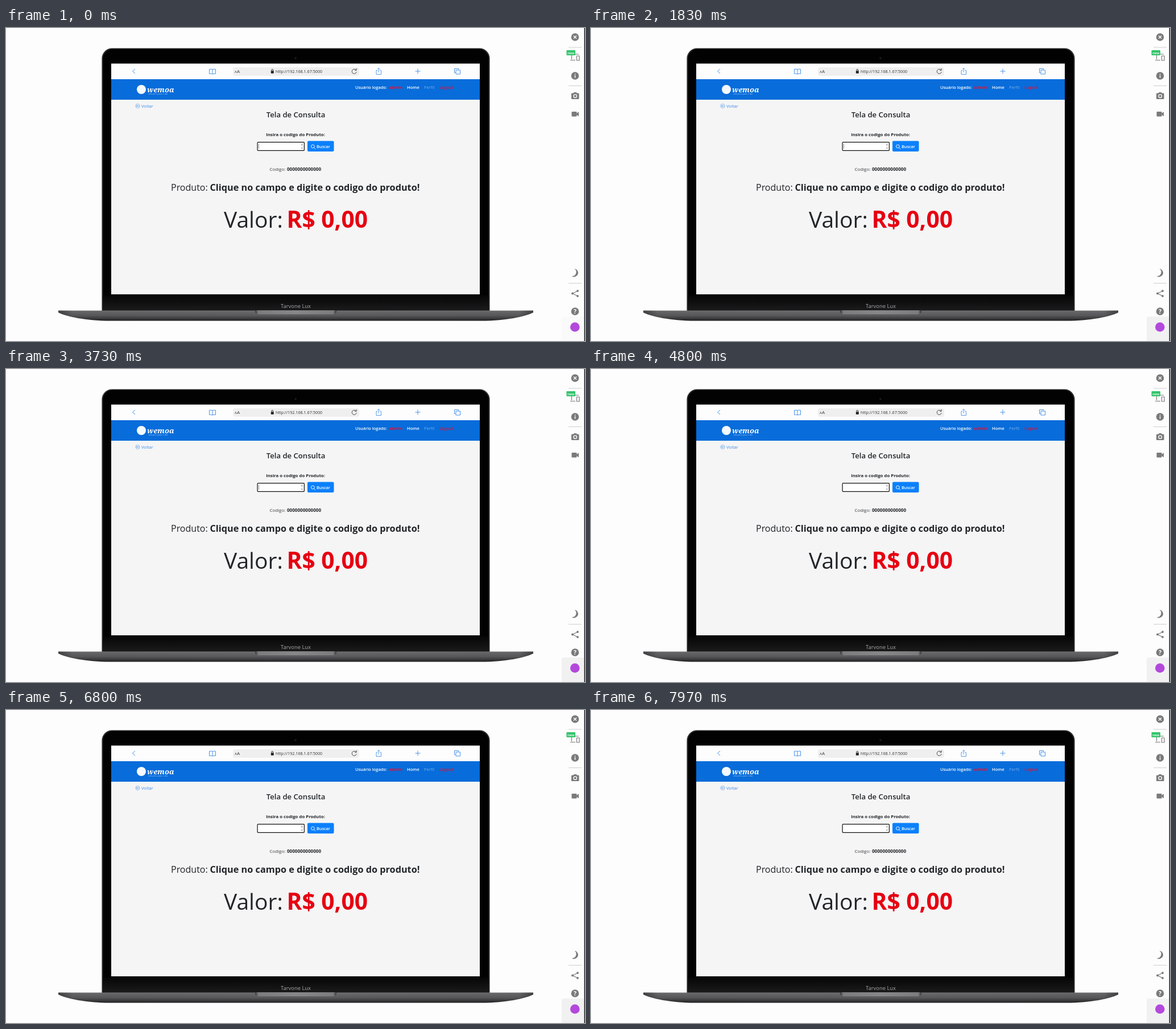
Recreate the animation shown at these times as an HTML page with a canvas. Size 1018 by 550 pixels, loop 8000 ms.

```html
<!DOCTYPE html>
<html lang="pt-BR">
<head>
<meta charset="utf-8">
<title>Tela de Consulta</title>
<style>
  html, body { margin: 0; width: 100%; height: 100%; overflow: hidden; background: #fdfdfd; }
  canvas { display: block; }
</style>
</head>
<body>
<canvas id="stage" width="1018" height="550"></canvas>
<script>
const ctx = document.getElementById('stage').getContext('2d');
const LOOP = 8000;
const SANS = '"Open Sans", "Noto Sans", sans-serif';
const INK = '#212529', ICON = '#7a7a7a', BLUE = '#4a94ea', RED = '#e60012';

function rect(x, y, w, h, fill, r = 0) {
  ctx.fillStyle = fill;
  ctx.beginPath();
  ctx.roundRect(x, y, w, h, r);
  ctx.fill();
}

function disc(x, y, r, fill) {
  ctx.fillStyle = fill;
  ctx.beginPath();
  ctx.arc(x, y, r, 0, Math.PI * 2);
  ctx.fill();
}

function path(d, color, width = 1) {
  ctx.strokeStyle = color;
  ctx.lineWidth = width;
  ctx.stroke(new Path2D(d));
}

function shape(d, fill) {
  ctx.fillStyle = fill;
  ctx.fill(new Path2D(d));
}

function text(str, x, y, size, color, weight = 400, align = 'left', family = SANS) {
  ctx.font = `${weight} ${size}px ${family}`;
  ctx.fillStyle = color;
  ctx.textAlign = align;
  ctx.fillText(str, x, y);
}

function gradient(x0, y0, x1, y1, ...stops) {
  const g = ctx.createLinearGradient(x0, y0, x1, y1);
  stops.forEach(([at, color]) => g.addColorStop(at, color));
  return g;
}

function laptop() {
  // lid
  rect(168.5, 35.5, 682, 462, '#2b2b2c', [18, 18, 0, 0]);
  rect(170.5, 37, 678, 460, '#020202', [17, 17, 0, 0]);
  rect(170.5, 470, 678, 27, gradient(0, 470, 0, 497, [0, '#060606'], [1, '#1b1b1c']));
  disc(509, 53, 2, '#15181c');
  text('Tarvone Lux', 509.5, 492, 9.4, '#a9a9ab', 400, 'center');

  // base
  const base = 'M92 496.5 H927 V500 C912 507 880 514.5 835 514.5 H184 C139 514.5 107 507 92 500 Z';
  shape(base, gradient(0, 496, 0, 515,
    [0, '#7d7d7f'], [0.12, '#69696c'], [0.5, '#59595c'], [0.8, '#38383a'], [1, '#1c1c1e']));
  shape(base, gradient(92, 0, 927, 0,
    [0, 'rgba(20,20,20,.5)'], [0.03, 'rgba(20,20,20,.05)'], [0.5, 'rgba(20,20,20,0)'],
    [0.97, 'rgba(20,20,20,.05)'], [1, 'rgba(20,20,20,.5)']));
  rect(438, 496, 143, 7, gradient(438, 0, 581, 0,
    [0, '#353537'], [0.04, '#7c7c7e'], [0.5, '#878789'], [0.96, '#7c7c7e'], [1, '#353537']), [0, 0, 5, 5]);
}

function toolbar() {
  rect(185, 62.5, 648, 28, '#fdfdfd');
  rect(399, 69, 222, 15, '#efeff0', 4);
  path('M227 72 L222.5 76 L227 80', BLUE);
  path('M363 73 Q360 71.5 357.5 72.5 V80.5 Q360 79.5 363 81 Q366 79.5 368.5 80.5 V72.5 Q366 71.5 363 73 V81', BLUE);
  text('A', 402, 79, 6, '#333');
  text('A', 406, 79, 8, '#333');
  path('M466.8 75.5 V74 Q466.8 72.5 468.2 72.5 Q469.7 72.5 469.7 74 V75.5', '#222', 0.9);
  rect(465.8, 75.3, 5, 4.4, '#222', 0.6);
  text('http://192.168.1.67:5000', 474, 79, 7.2, '#333');
  path('M615.5 74 A4 4 0 1 0 616.2 77', '#444');
  path('M613 74.2 H616.2 V71', '#444');
  path('M653 74.5 H651 V81.5 H659.5 V74.5 H657.5 M655.2 78 V70.5 M653 72.6 L655.2 70.4 L657.4 72.6', BLUE, 0.9);
  path('M719.5 76 H728.5 M724 71.5 V80.5', BLUE);
  path('M788.5 71.5 H795.5 V73.5 M788.5 71.5 V78.5 H790.5 M791 74 H798.5 V81 H791 Z', BLUE);
}

function navbar() {
  rect(185, 90, 648, 36, '#086cda');
  disc(238, 108, 8, '#f4f9ff');
  text('wemoa', 248, 112.5, 13, '#fff', 'italic 700', 'left', '"Noto Serif", serif');
  text('soluções para o dia', 250, 117, 3.8, '#a9cdf5');
  text('Usuário logado:', 614, 107, 7.4, '#fff', 600);
  text('admin', 673, 107, 7.5, '#e8102f', 700);
  text('Home', 705, 107, 7.5, '#fff', 600);
  text('Perfil', 735, 107, 7.5, '#78aee9');
  text('Logout', 762, 107, 7.3, '#d8143a', 600);
}

function page() {
  rect(185, 126, 648, 342, '#f5f5f5');
  ctx.strokeStyle = '#6aa7f0';
  ctx.lineWidth = 0.8;
  ctx.beginPath();
  ctx.arc(231.5, 137, 3.6, 0, Math.PI * 2);
  ctx.stroke();
  path('M234 137 H229.6 M231.2 135.3 L229.5 137 L231.2 138.7', '#4b93ec', 0.8);
  text('Voltar', 238, 139.6, 7.6, '#3d8bea');

  text('Tela de Consulta', 509.5, 156.5, 13.1, INK, 600, 'center');
  text('Insira o codigo do Produto:', 509, 190, 7.8, INK, 700, 'center');

  rect(441.5, 200, 83.5, 16, '#111', 2);
  rect(442.7, 201.2, 81.1, 13.6, '#fff', 1);
  shape('M518.8 206 L520.3 204 L521.8 206 Z M518.8 210.5 L520.3 212.5 L521.8 210.5 Z', '#777');

  rect(530, 198.5, 46.5, 18.5, '#0b80fb', 2);
  path('M542.3 208 a2.9 2.9 0 1 1 -5.8 0 a2.9 2.9 0 1 1 5.8 0 M541.4 210.2 L544 212.8', '#fff', 0.9);
  text('Buscar', 546, 211, 7.3, '#fff', 600);

  text('Codigo:', 463.5, 251, 7.9, '#3a3d40');
  text('0000000000000', 494, 251, 8.1, INK, 700);
  text('Produto:', 290, 286, 16, INK, 370);
  text('Clique no campo e digite o codigo do produto!', 358.5, 286, 16.25, INK, 700);
  text('Valor:', 383, 351, 39, INK, 370);
  text('R$ 0,00', 493.5, 351, 40.8, RED, 700);
}

function sidebar() {
  rect(1016.6, 0, 1.4, 550, '#1d1d1d');
  for (const y of [33.5, 101, 448]) rect(989, y, 23, 1, '#cfcfcf');

  disc(1000.5, 16, 6.8, ICON);
  path('M998 13.5 L1003 18.5 M1003 13.5 L998 18.5', '#fff', 1.4);

  path('M994.5 48 V55 M992 56.5 H1001 M995 46 H1007', ICON, 1.2);
  path('M1003.5 49 H1008 V57 H1003.5 Z', ICON, 1.2);
  rect(985.5, 39, 15.5, 9, '#35c46d', 1);
  text('new', 993.2, 45.7, 6, '#fff', 600, 'center');

  disc(1000.5, 84, 6.8, ICON);
  rect(999.8, 80.3, 1.5, 1.6, '#fff');
  rect(999.8, 83, 1.5, 4.6, '#fff');

  rect(994, 114.5, 13.5, 10.5, ICON, 1.2);
  rect(998, 113, 5.5, 3, ICON, 1);
  disc(1000.7, 119.7, 3.4, '#fff');
  disc(1000.7, 119.7, 2.1, ICON);

  rect(994.5, 147, 9, 8.5, ICON, 1);
  shape('M1003 150.3 L1007 147.3 V155.2 L1003 152.3 Z', ICON);

  // crescent moon
  shape('M999.5 423 A7.2 7.2 0 0 1 994.5 436 A7.2 7.2 0 1 0 999.5 423 Z', ICON);

  path('M1005 462 L996 466.5 L1005 471', ICON, 1.2);
  for (const [x, y] of [[1005, 462], [996, 466.5], [1005, 471]]) disc(x, y, 1.9, ICON);

  disc(1000.5, 498, 6.8, ICON);
  text('?', 1000.5, 502, 10.5, '#fff', 700, 'center');
}

function assistant(t) {
  rect(977, 507, 39.6, 43, t < 1800 ? '#fafafa' : '#f1f1f2', 3);
  disc(1000.3, 525.5, 8.3, '#b348dc');
}

function caret(t) {
  if (t < 1400 || (t >= 1800 && t < 4600)) rect(444, 203.5, 0.8, 8.5, '#777');
}

function draw(t) {
  rect(0, 0, 1018, 550, '#fdfdfd');
  laptop();
  page();
  toolbar();
  navbar();
  assistant(t);
  sidebar();
  caret(t);
}

const start = performance.now();
function tick() {
  draw((performance.now() - start) % LOOP);
  requestAnimationFrame(tick);
}
tick();
</script>
</body>
</html>
```
